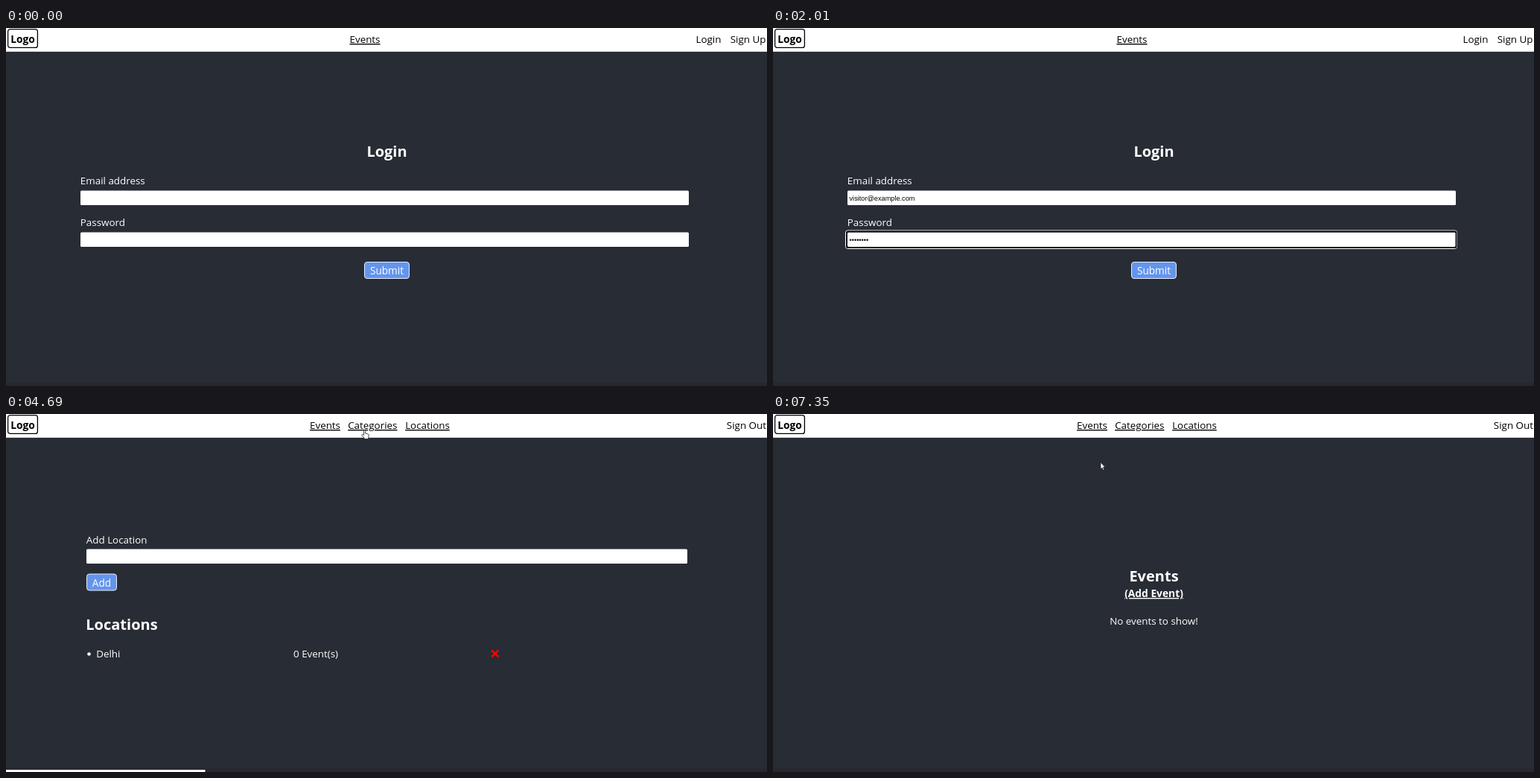
An HTML page that plays this animation: 1022x481 px, repeating every 8000 ms.

```html
<!DOCTYPE html>
<html lang="en">
<head>
<meta charset="utf-8">
<title>Event manager walkthrough</title>
<style>
  html, body { margin: 0; height: 100%; overflow: hidden; background: #282c34; }
  svg { display: block; width: 1022px; height: 481px; }
  text { font: 13.4px "Open Sans", "Noto Sans", sans-serif; fill: #fff; white-space: pre; }
  .dark { fill: #000; }
  .link { text-decoration: underline; }
  .bold { font-weight: 700; font-size: 13.8px; }
  .title { font-weight: 700; font-size: 20px; }
  .field { font: 9.2px "Liberation Sans", Arial, sans-serif; fill: #000; }
  .mid { text-anchor: middle; }
  .end { text-anchor: end; }
</style>
</head>
<body>
<svg id="stage" viewBox="0 0 1022 481"></svg>
<script>
const LOOP = 8000;
const MID = 511.5;

const text = (x, y, str, cls = '') => `<text x="${x}" y="${y}" class="${cls}">${str}</text>`;
const rect = (x, y, w, h, fill, more = '') =>
  `<rect x="${x}" y="${y}" width="${w}" height="${h}" fill="${fill}" ${more}/>`;
const title = (y, str) => text(MID, y, str, 'title mid');

const button = (x, y, w, label) =>
  rect(x + .5, y + .5, w - 1, 22, '#6495ed', 'rx="3.5" stroke="#e8effc"') +
  `<text x="${x + w / 2}" y="${y + 17}" class="mid" style="font-size:13.6px">${label}</text>`;

const input = (x, y, w, value = '') =>
  rect(x, y, w, 19.5, '#fff', 'rx="1.5"') + text(x + 2.5, y + 13.3, value, 'field');

const formRow = (y, label, value) => text(99.8, y, label) + input(100, y + 8.2, 817, value);

const focusRing = y =>
  rect(97.5, y - 2.5, 821, 24.5, 'none', 'rx="3" stroke="#fff"') +
  rect(99, y - 1, 818.5, 21.5, 'none', 'rx="2" stroke="#101010" stroke-width="2"');

const hand = (x, y) => `<path transform="translate(${x} ${y})" fill="#fff" stroke="#222" stroke-width=".8"
  d="M-1 7V1Q0-.6 1 1V4.5L5 5.5Q6 6 5.8 7.5L5 10V12H-.5V10.5L-3.8 7Q-3.5 5.3-2 6.3Z"/>`;
const arrow = (x, y) => `<path transform="translate(${x} ${y})" fill="#fff" stroke="#111" stroke-width=".6"
  d="M0 0V9L2 7.2L3.4 10.3L4.8 9.7L3.4 6.6H6Z"/>`;

const statusBar = (w, fill = '#fff') => rect(0, 478, w, 3, fill);

const frame =
  rect(0, 0, 1022, 481, '#282c34') +
  rect(0, 476.5, 1022, 4.5, '#2b2530') +
  rect(0, 0, 1022, 31, '#fff') +
  rect(0, 31, 1022, 1, '#cfe0d6') +
  rect(2.6, 1.6, 39.8, 24.8, '#fff', 'rx="3" stroke="#000" stroke-width="1.3"') +
  text(22.5, 20, 'Logo', 'dark bold mid');

const guest = body => frame +
  text(482, 20, 'Events', 'dark link mid') +
  text(943.5, 20, 'Login', 'dark mid') +
  text(1020.5, 20, 'Sign Up', 'dark end') + body;

const member = body => frame +
  text(428.5, 20, 'Events', 'dark link mid') +
  text(492.3, 20, 'Categories', 'dark link mid') +
  text(566, 20, 'Locations', 'dark link mid') +
  text(1021, 20, 'Sign Out', 'dark end') + body;

const login = (email = '', password = '') => guest(
  title(173, 'Login') +
  formRow(210.3, 'Email address', email) +
  formRow(266.3, 'Password', password) +
  (password && focusRing(274.5)) +
  button(481, 314, 61, 'Submit'));

const signUp = () => guest(
  title(116.5, 'Sign Up') +
  formRow(154.3, 'Name') +
  formRow(210.3, 'Email address') +
  formRow(266.3, 'Password') +
  text(99.8, 322.3, 'Do you require admin access? (Please note that access is subject to approval)') +
  rect(100, 330.5, 817, 19, '#e9e9ed', 'rx="2"') +
  text(103, 344, 'No', 'field') +
  '<path d="M906.5 338.7l3 3l3-3" fill="none" stroke="#000" stroke-width="1.2"/>' +
  button(474, 370, 61, 'Submit'));

const listPage = (one, many, { typed = '', item } = {}) => member(
  text(107.8, 174, 'Add ' + one) +
  input(108, 181.5, 807, typed) +
  button(108, 214.5, 41, 'Add') +
  text(107.3, 290, many, 'title') +
  (item
    ? '<circle cx="111.5" cy="322.5" r="2.3" fill="#fff"/>' +
      text(121.2, 326.7, item) +
      text(386, 326.7, '0 Event(s)') +
      '<path d="M652.3 317.3l9 9m0-9l-9 9" stroke="red" stroke-width="2.6"/>'
    : text(107.8, 326.7, `No ${many.toLowerCase()} to show!`)));

const locations = state => listPage('Location', 'Locations', state);
const categories = state => listPage('Category', 'Categories', state);
const noEvents = y => text(MID, y, 'No events to show!', 'mid');

// [start in ms, markup]
const scenes = [
  [0, login()],
  [670, signUp() + hand(988, 18.5)],
  [1340, guest(title(235, 'Events') + noEvents(274)) + hand(484.2, 20.5)],
  [2010, login('visitor@example.com', '••••••••')],
  [2700, member(
    text(322.8, 250.5, 'Please add atleast one location to create an event. ') +
    text(700, 250.5, 'Click here', 'link end')) + hand(668.7, 245) + statusBar(263, '#dcdcde')],
  [3360, locations() + arrow(668, 245) + statusBar(263, '#eee')],
  [4020, locations({ typed: 'Delhi' }) + statusBar(263)],
  [4690, locations({ item: 'Delhi' }) + hand(481.5, 21.5) + statusBar(267.5)],
  [5360, categories() + arrow(314, 229.5)],
  [6020, categories({ typed: 'Sports' })],
  [6690, categories({ item: 'Sports' }) + hand(432.7, 15.5) + statusBar(253)],
  [7350, member(title(225, 'Events') + text(MID, 246, '(Add Event)', 'bold link mid') + noEvents(283)) +
    arrow(440, 65)],
];

const stage = document.getElementById('stage');
let shown;

function draw(now) {
  const t = now % LOOP;
  const scene = scenes.findLast(([start]) => start <= t);
  if (scene !== shown) {
    stage.innerHTML = scene[1];
    shown = scene;
  }
}

const begin = performance.now();
function tick() {
  draw(performance.now() - begin);
  requestAnimationFrame(tick);
}
tick();
</script>
</body>
</html>
```
